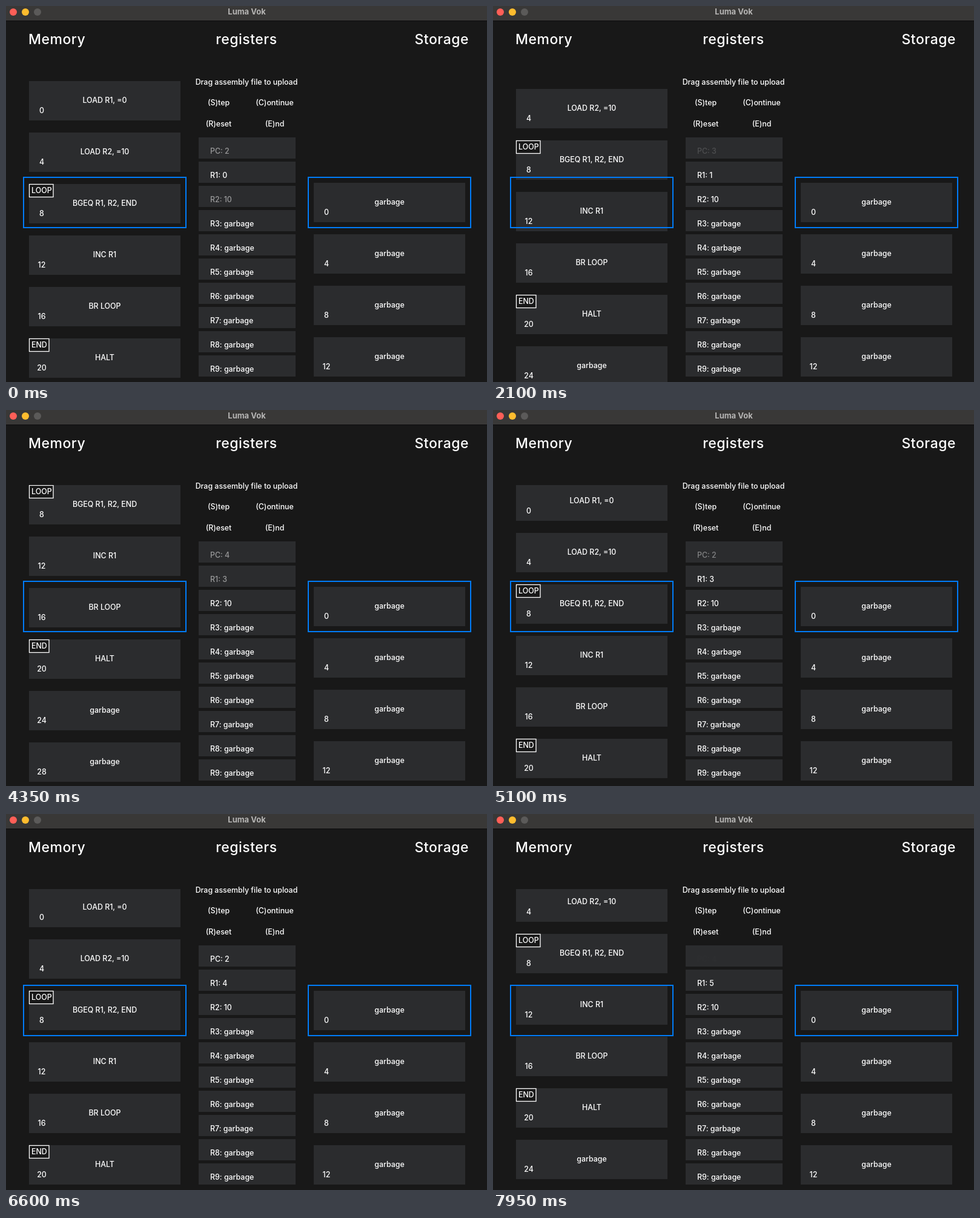
These frames come from a looping animation (794 px wide and 621 px high, 8 s). An HTML page:

```html
<!DOCTYPE html>
<html lang="en">
<head>
<meta charset="utf-8">
<title>Luma Vok</title>
<style>
  html, body { margin: 0; width: 100%; height: 100%; overflow: hidden; background: #181818; }
  svg { display: block; width: 100vw; height: 100vh; }
  text { font: 500 12.4px Inter, Roboto, sans-serif; fill: #fff; white-space: pre; }
  .head { font-size: 23px; letter-spacing: .5px; }
  .title { font-size: 13px; font-weight: 700; fill: #b5b4b3; }
  .mid { text-anchor: middle; }
  .end { text-anchor: end; }
  .card { fill: #2b2c2e; }
  .tag { fill: #181818; stroke: #fff; stroke-width: 1.3; }
  .focus { fill: none; stroke: #007bf8; stroke-width: 2; }
</style>
</head>
<body>
<svg viewBox="0 0 794 621" preserveAspectRatio="none">
  <defs><clipPath id="view"><rect x="0" y="124" width="310" height="497"/></clipPath></defs>
</svg>
<script>
const svg = document.querySelector('svg');

function add(parent, name, attrs, content) {
  const el = document.createElementNS('http://www.w3.org/2000/svg', name);
  for (const key in attrs) el.setAttribute(key, attrs[key]);
  if (content !== undefined) el.textContent = content;
  parent.append(el);
  return el;
}
const box = (parent, x, y, width, height, cls) =>
  add(parent, 'rect', { x, y, width, height, class: cls });
const label = (parent, x, y, str, cls = '') =>
  add(parent, 'text', { x, y, class: cls }, str);

// Window bar
add(svg, 'rect', { width: 794, height: 24, fill: '#393837' });
add(svg, 'rect', { y: 24, width: 794, height: 1, fill: '#0c0c0c' });
['#ff5f57', '#febc2e', '#5b5a59'].forEach((fill, i) =>
  add(svg, 'circle', { cx: 12 + i * 20, cy: 10, r: 6, fill }));
label(svg, 397.5, 14, 'Luma Vok', 'title mid');

// Headings and help
label(svg, 37, 63, 'Memory', 'head');
label(svg, 397, 63, 'registers', 'head mid');
label(svg, 764, 63, 'Storage', 'head end');
label(svg, 397, 130, 'Drag assembly file to upload', 'mid');
label(svg, 351, 164, '(S)tep', 'mid');
label(svg, 443.5, 164, '(C)ontinue', 'mid');
label(svg, 351, 199, '(R)eset', 'mid');
label(svg, 443.5, 199, '(E)nd', 'mid');

// Memory and storage cells
const PITCH = 85, HOME = 292;

function cell(parent, x, y, str, address, tag) {
  box(parent, x, y, 250, 65, 'card');
  label(parent, x + 125, y + 36, str, 'mid');
  label(parent, x + 21, y + 53, address, 'mid');
  if (tag) {
    box(parent, x + .5, y + .5, tag === 'LOOP' ? 39.5 : 32.5, 21, 'tag');
    label(parent, x + 4, y + 15, tag);
  }
}

const program = ['LOAD R1, =0', 'LOAD R2, =10', 'BGEQ R1, R2, END', 'INC R1', 'BR LOOP', 'HALT',
  'garbage', 'garbage', 'garbage'];
const tags = { 2: 'LOOP', 5: 'END' };
const view = add(svg, 'g', { 'clip-path': 'url(#view)' });
const memory = add(view, 'g', {});
program.forEach((str, i) => cell(memory, 38, i * PITCH, str, i * 4, tags[i]));
for (let i = 0; i < 4; i++) cell(svg, 508, HOME + i * PITCH, 'garbage', i * 4);
box(svg, 29, 283, 268, 83, 'focus');
box(svg, 499, 283, 268, 83, 'focus');

// Registers
const names = ['PC', ...Array.from({ length: 9 }, (_, i) => 'R' + (i + 1))];
const regs = names.map((name, i) => {
  const y = 217 + i * 40;
  box(svg, 318, y, 160, 35, 'card');
  return label(svg, 337, y + 27, name + ': garbage');
});

// Each instruction fades the old values out, then the new ones in
function setReg(i, before, after, u) {
  const changed = before !== after;
  regs[i].textContent = names[i] + ': ' + (u < .5 ? before : after);
  regs[i].style.opacity = changed ? Math.abs(1 - 2 * u) ** 1.5 : 1;
}

const LOOP = 8000, TICK = 150;
// [time in ms, instructions executed]
const pace = [[0, .82], [2100, 4.647], [3450, 7.207], [4350, 8.82], [5700, 11.346], [6600, 13], [7950, 15.482]];

function progress(t) {
  const i = Math.max(1, pace.findIndex(p => p[0] >= t));
  const [t0, a] = pace[i - 1], [t1, b] = pace[i];
  return a + (b - a) * (t - t0) / (t1 - t0);
}

const ease = u => u < .5 ? 4 * u ** 3 : 1 - 4 * (1 - u) ** 3;
const pcAfter = k => k < 0 ? 1 : 2 + k % 3;

function draw(t) {
  const p = progress(Math.floor(t / TICK) * TICK);
  const k = Math.floor(p), u = p - k;
  const from = pcAfter(k - 1), to = pcAfter(k);
  const pc = from + (to - from) * ease(u);
  memory.setAttribute('transform', `translate(0 ${Math.round(HOME - pc * PITCH)})`);
  setReg(0, from, to, u);
  setReg(1, Math.floor(k / 3), Math.floor((k + 1) / 3), u);
  setReg(2, k ? 10 : 'garbage', 10, u);
}

const start = performance.now();
function tick() {
  draw((performance.now() - start) % LOOP);
  requestAnimationFrame(tick);
}
tick();
</script>
</body>
</html>
```
